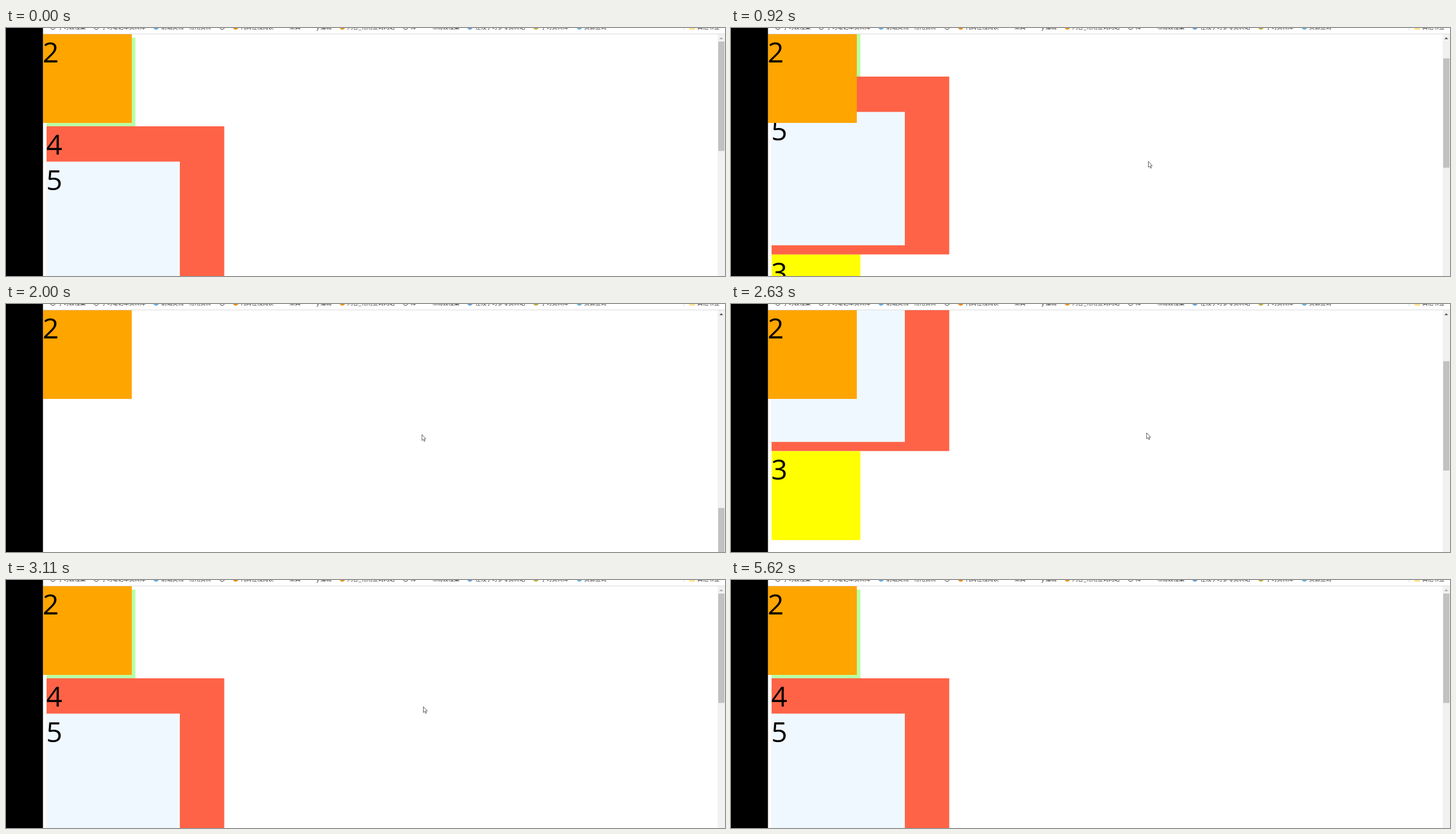
These frames come from a looping animation (1274x439 px, 5.69 s). An HTML page:

```html
<!DOCTYPE html>
<html lang="zh">
<head>
<meta charset="utf-8">
<title>Fixed box while scrolling</title>
<style>
  html, body { margin: 0; width: 100%; height: 100%; overflow: hidden; background: #fff; }
  body > * { position: absolute; }
  svg { left: 0; top: 0; width: 1274px; height: 439px; }
  svg text { font: 50px "Open Sans", "Noto Sans", sans-serif; }
  #marks {
    left: 78px; top: -9px; height: 14px; display: flex; align-items: center; gap: 14px;
    white-space: nowrap; color: #333;
    font: 9.8px/14px "Noto Sans CJK SC", "Noto Sans CJK", sans-serif;
  }
  #marks span { display: flex; align-items: center; gap: 4px; }
  #marks i { width: 10px; height: 10px; border-radius: 50%; box-sizing: border-box; }
  #marks .ring { border: 1.5px solid #333; }
  #marks .other { position: absolute; left: 1133px; }
  #marks .other i { border-radius: 1px; }
</style>
</head>
<body>
<svg viewBox="0 0 1274 439">
  <defs><clipPath id="view"><rect x="65" y="10.6" width="1196" height="429"/></clipPath></defs>
  <g clip-path="url(#view)">
    <g id="page"></g>
    <g id="fixed"></g>
  </g>
  <path d="M65 10.5H1274M1201.5 0V4" stroke="#d8dadd"/>
  <rect x="1261" y="11" width="13" height="428" fill="#f0f1f1"/>
  <path id="up" d="M1264.2 19.8L1267.4 16.2L1270.6 19.8Z"/>
  <rect id="thumb" x="1262" y="24" width="11" height="193.6" fill="#c1c1c1"/>
  <rect width="65.5" height="439"/>
  <path id="cursor" d="M0 0V10.6L2.4 8.5L4 12.2L5.5 11.5L4 7.9H7Z"
        fill="#fff" stroke="#333" stroke-width=".8" stroke-linejoin="round"/>
</svg>
<div id="marks"></div>
<script>
  const LOOP = 5690, START = 170, STEP = 68.2;
  const UNIT = 78.7, LEFT = 71.9;
  const $ = id => document.getElementById(id);

  // A square measured in units, with its number at the top left
  function box(parent, n, x, y, units, fill) {
    const size = units * UNIT;
    $(parent).innerHTML += `<rect x="${x}" y="${y}" width="${size}" height="${size}" fill="${fill}"/>
      <text x="${x - 0.6}" y="${y + 50}">${n}</text>`;
  }
  box("page", 1, LEFT, 17, 2, "#b9ffa4");
  box("page", 4, LEFT, 174, 4, "#ff6347");
  box("page", 5, LEFT, 236.5, 3, "#f0f8ff");
  box("page", 3, LEFT, 489, 2, "#ff0");
  box("fixed", 2, 65.5, 10.6, 2, "#ffa500");

  // Bookmark row, flowing from the left and cut off by the top edge
  function mark(label, color = "", cls = "") {
    const icon = color ? `style="background:${color}"` : `class="ring"`;
    $("marks").innerHTML += `<span class="${cls}"><i ${icon}></i>${label}</span>`;
  }
  mark("学习教程集");
  mark("学习笔记本资料库");
  mark("前端文档·常用资料", "#6aa9dc");
  mark("");
  mark("代码在线阅读", "#e98a1c");
  mark("工具", "#fff");
  mark("y 编辑", "#fff");
  mark("问答_常用查询网站", "#e9921f");
  mark("样");
  mark("布局教程集", "#fff");
  mark("在线学习参考资料站", "#6f9fd0");
  mark("学习资料库", "#b5b042");
  mark("资源查询", "#6bb0d0");
  mark("其他书签", "#ffe08a", "other");

  // Keys are [step, value...]
  const scroll = [[9, 0], [11, 88], [16, 321], [23, 997], [29, 997], [36, 228.5], [41, 0]];
  const path = [
    [0, 1218, 430], [5, 739.5, 236], [11, 739.5, 236], [16, 737, 232], [27, 737, 231],
    [36, 736.5, 228], [43, 739.5, 224], [49, 741.5, 222.5], [58, 1036, 338.5], [67, 1229, 437]
  ];

  function at(keys, step) {
    const n = keys.findIndex(k => k[0] > step);
    const b = keys.at(n), a = n > 0 ? keys[n - 1] : b;
    const p = a === b ? 0 : (step - a[0]) / (b[0] - a[0]);
    return a.slice(1).map((v, j) => v + (b[j + 1] - v) * p);
  }

  function draw(ms) {
    const step = Math.floor((ms - START) / STEP + 0.2);
    const [y] = at(scroll, step), [cx, cy] = at(path, step);
    $("page").setAttribute("transform", `translate(0 ${-y})`);
    $("thumb").setAttribute("y", 24 + y * 0.338);
    $("up").setAttribute("fill", y > 0 ? "#505050" : "#a8a8a8");
    $("cursor").setAttribute("transform", `translate(${cx} ${cy})`);
    $("cursor").setAttribute("visibility", step >= 0 && step < 68 ? "visible" : "hidden");
  }

  const t0 = performance.now();
  function tick() {
    draw((performance.now() - t0) % LOOP);
    requestAnimationFrame(tick);
  }
  tick();
</script>
</body>
</html>
```
